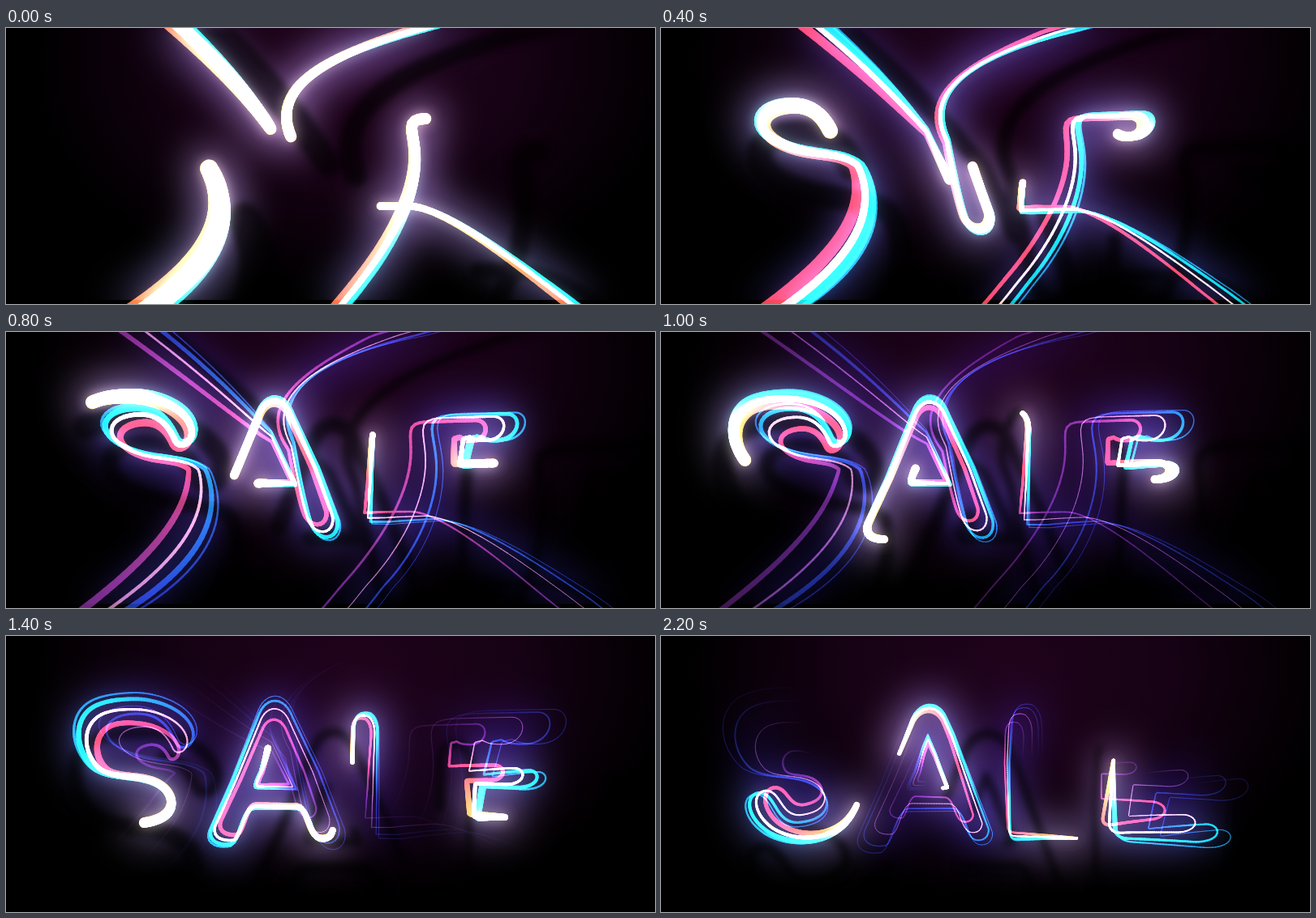
Write an HTML page with a canvas that moves like this. It is 800 by 341 pixels and loops after 2300 ms.

```html
<!DOCTYPE html>
<html lang="en">
<head>
<meta charset="utf-8">
<title>Neon sale</title>
<style>
html, body { margin: 0; width: 100%; height: 100%; overflow: hidden; background: #000; }
canvas { display: block; }
</style>
</head>
<body>
<canvas id="stage" width="800" height="341"></canvas>
<script>
const W = 800, H = 341, LOOP = 2300, FRAME = 100, STEP = 8, LIFE = 1550;
const ctx = document.getElementById('stage').getContext('2d');
const clamp = (v, a = 0, b = 1) => Math.min(b, Math.max(a, v));

// Every trail has one leg of its path between two neighbouring times (ms)
const TIMES = [-350, 0, 400, 800, 1000, 1400, 1800, 2200];

// cx, cy, zoom: old light swells or shrinks about this centre, px per 100 ms
// spread: how far the colours part, pull: sideways drift of the incoming tail
const trails = [
  { width: 20, cx: 190, cy: 170, zoom: -.004, spread: .045, pull: -5, flare: 200, legs: [
    'M110 400C255 325 295 240 248 170',
    'C225 150 185 158 150 143C105 125 115 93 160 93C190 93 202 112 210 130',
    'C215 143 234 136 232 118C228 92 190 76 160 76C135 76 115 80 104 88',
    'C82 104 84 138 105 160',
    'C122 178 160 170 185 182C212 195 215 228 168 231',
    'C140 231 142 196 122 194C104 194 102 222 132 242',
    'C165 262 225 258 242 207'] },
  { width: 13, cx: 330, cy: 170, zoom: .006, spread: .033, pull: 0, legs: [
    'M600 -20C480 10 310 45 353 138',
    'C358 165 366 210 375 236C384 258 410 255 406 230L383 168',
    'L352 102C342 76 320 78 312 100L280 180',
    'L254 238C250 252 262 258 278 256',
    'C288 254 292 212 306 212L358 212C376 212 372 251 390 251Q402 251 403 238',
    'L360 122',
    'L350 100C340 80 316 82 308 108L293 147'] },
  { width: 13, cx: 330, cy: 170, zoom: .006, spread: .033, pull: -4, flare: 200, legs: [
    'M150 -80C230 -5 295 70 327 126',
    'L356 188', 'L310 187', 'Q304 187 314 168', 'L323 138',
    'L329 124L338 145', 'L353 187L347 188'] },
  { width: 9, cx: 400, cy: 160, zoom: .03, spread: .025, pull: 4, legs: [
    'M770 400C690 345 560 225 500 220L460 220',
    'L441 222L446 190', 'L452 126', 'Q454 106 445 100',
    'C432 96 428 104 428 118L427 157', 'L430 243', 'Q430 250 440 250L514 250'] },
  { width: 13, cx: 440, cy: 135, zoom: .05, spread: .045, pull: 3, legs: [
    'M360 395C440 320 505 225 503 155C502 125 490 112 520 112',
    'L578 109C598 109 596 135 576 134Q566 134 562 130',
    'L555 132L555 163L603 162',
    'L618 162C636 164 632 184 607 182',
    'L577 182L577 223L617 224',
    'L655 225C678 228 676 249 645 249L597 249',
    'L575 249Q558 249 558 235L558 152'] }
];

// lag: place in the colour split, decay: ms in which the line thins; ramp: age, r, g, b
const layers = [
  { lag: -1, decay: 620, size: 1.1, ramp: [
    [0, 255, 205, 70], [150, 255, 160, 60], [380, 245, 62, 82],
    [750, 225, 70, 90], [1050, 95, 35, 120], [LIFE, 0, 0, 0]] },
  { lag: 0, decay: 620, size: .95, ramp: [
    [0, 255, 255, 255], [180, 20, 225, 220], [650, 8, 200, 205],
    [1000, 30, 55, 160], [LIFE, 0, 0, 0]] },
  { lag: .25, decay: 400, size: .8, ramp: [
    [0, 255, 255, 255], [200, 10, 195, 190], [650, 20, 130, 180],
    [1000, 30, 40, 140], [LIFE, 0, 0, 0]] },
  { lag: -.42, decay: 440, size: 1, ramp: [
    [0, 255, 255, 250], [500, 255, 245, 240], [850, 245, 180, 185],
    [1150, 120, 65, 135], [LIFE, 0, 0, 0]] }
];
const glow = { lag: -.3, decay: 1200, size: 1, extra: 26, ramp: [
  [0, 160, 138, 195], [300, 95, 92, 170], [700, 45, 42, 140],
  [1200, 18, 10, 60], [LIFE, 0, 0, 0]] };
const shade = { lag: -.3, decay: 900, size: 1.4, extra: 2, limit: 1100,
  ramp: [[0, 0, 0, 0], [LIFE, 0, 0, 0]] };

function rgb(ramp, age) {
  let i = 1;
  while (i < ramp.length - 1 && ramp[i][0] < age) i++;
  const a = ramp[i - 1], b = ramp[i], k = clamp((age - a[0]) / (b[0] - a[0]));
  return `rgb(${[1, 2, 3].map(c => Math.round(a[c] + (b[c] - a[c]) * k))})`;
}

// Smooth rise through the pen lengths reached at TIMES
function travel(lengths, t) {
  const last = TIMES.length - 1;
  const speed = i => (lengths[i + 1] - lengths[i]) / (TIMES[i + 1] - TIMES[i]);
  const tangent = i => {
    if (i === 0) return speed(0);
    if (i === last) return speed(last - 1);
    const a = speed(i - 1), b = speed(i);
    return 2 * a * b / (a + b);
  };
  let i = 0;
  while (i < last - 1 && TIMES[i + 1] < t) i++;
  const d = TIMES[i + 1] - TIMES[i], u = (t - TIMES[i]) / d, v = 1 - u;
  return v * v * ((1 + 2 * u) * lengths[i] + u * d * tangent(i)) +
         u * u * ((3 - 2 * u) * lengths[i + 1] - v * d * tangent(i + 1));
}

function trace(trail) {
  const path = document.createElementNS('http://www.w3.org/2000/svg', 'path');
  const lengths = [0];
  let d = '';
  for (const leg of trail.legs) {
    path.setAttribute('d', d += leg);
    lengths.push(path.getTotalLength());
  }
  const dots = [];
  for (let t = TIMES[0]; t <= 2200; t += STEP) {
    const { x, y } = path.getPointAtLength(travel(lengths, t));
    const flare = trail.flare && t < 0 ? 1 - t / trail.flare : 1;
    dots.push({ t, x, y, tail: clamp(-t / 250),
      width: trail.width * flare * (1 - .65 * Math.max(0, t) / 2200) });
  }
  return dots;
}
for (const trail of trails) trail.dots = trace(trail);

// Where light drawn at p has floated to
function float(p, trail, lag, age) {
  const k = age / 100;
  const late = 1 - Math.max(0, p.t) / 2000;
  const grow = k * (1 - p.tail) * (trail.zoom * late + trail.spread * lag);
  return {
    x: p.x + (p.x - trail.cx) * grow + k * p.tail * (trail.pull + 5 * lag),
    y: p.y + (p.y - trail.cy) * grow
  };
}

const buffer = document.createElement('canvas');
buffer.width = W;
buffer.height = H;
const pen = buffer.getContext('2d');

function paintLayer(layer, now) {
  pen.globalCompositeOperation = 'source-over';
  pen.clearRect(0, 0, W, H);
  pen.globalCompositeOperation = 'lighten';
  pen.lineCap = 'round';
  for (const trail of trails) {
    let last = null;
    for (const p of trail.dots) {
      const age = now - p.t;
      if (age < 0) break;
      if (age > (layer.limit || LIFE)) continue;
      const spot = float(p, trail, layer.lag, age);
      if (last) {
        const thin = Math.exp(-age / layer.decay);
        pen.strokeStyle = rgb(layer.ramp, age);
        pen.lineWidth = Math.max(1, p.width * layer.size * thin) + (layer.extra || 0);
        pen.beginPath();
        pen.moveTo(last.x, last.y);
        pen.lineTo(spot.x, spot.y);
        pen.stroke();
      }
      last = spot;
    }
  }
}

function stamp(mode, alpha, blur) {
  ctx.globalCompositeOperation = mode;
  ctx.globalAlpha = alpha;
  ctx.filter = blur ? `blur(${blur}px)` : 'none';
  ctx.drawImage(buffer, 0, 0);
  ctx.filter = 'none';
  ctx.globalAlpha = 1;
  ctx.globalCompositeOperation = 'source-over';
}

function wall() {
  ctx.fillStyle = '#000';
  ctx.fillRect(0, 0, W, H);
  ctx.save();
  ctx.translate(430, 40);
  ctx.scale(1, .72);
  const g = ctx.createRadialGradient(0, 0, 0, 0, 0, 400);
  g.addColorStop(0, 'rgb(32,3,28)');
  g.addColorStop(.5, 'rgb(22,2,20)');
  g.addColorStop(1, '#000');
  ctx.fillStyle = g;
  ctx.fillRect(-430, -60, W, 500);
  ctx.restore();
}

function draw(now) {
  wall();
  paintLayer(glow, now);
  stamp('lighter', .85, 24);

  // Shadow on the wall behind, seen larger
  paintLayer(shade, now);
  ctx.save();
  ctx.translate(130, 0);
  ctx.scale(1.36, 1.36);
  ctx.translate(-130, 0);
  stamp('source-over', .6, 4);
  ctx.restore();
  ctx.fillStyle = '#000';
  ctx.fillRect(0, 336, W, 5);

  for (const layer of layers) {
    paintLayer(layer, now);
    stamp('lighter', .14, 8);
    stamp('lighter', 1, 0);
  }
}

let shown = -1;
function tick() {
  const now = Math.floor(performance.now() % LOOP / FRAME) * FRAME;
  if (now !== shown) draw(shown = now);
  requestAnimationFrame(tick);
}
tick();
</script>
</body>
</html>
```
